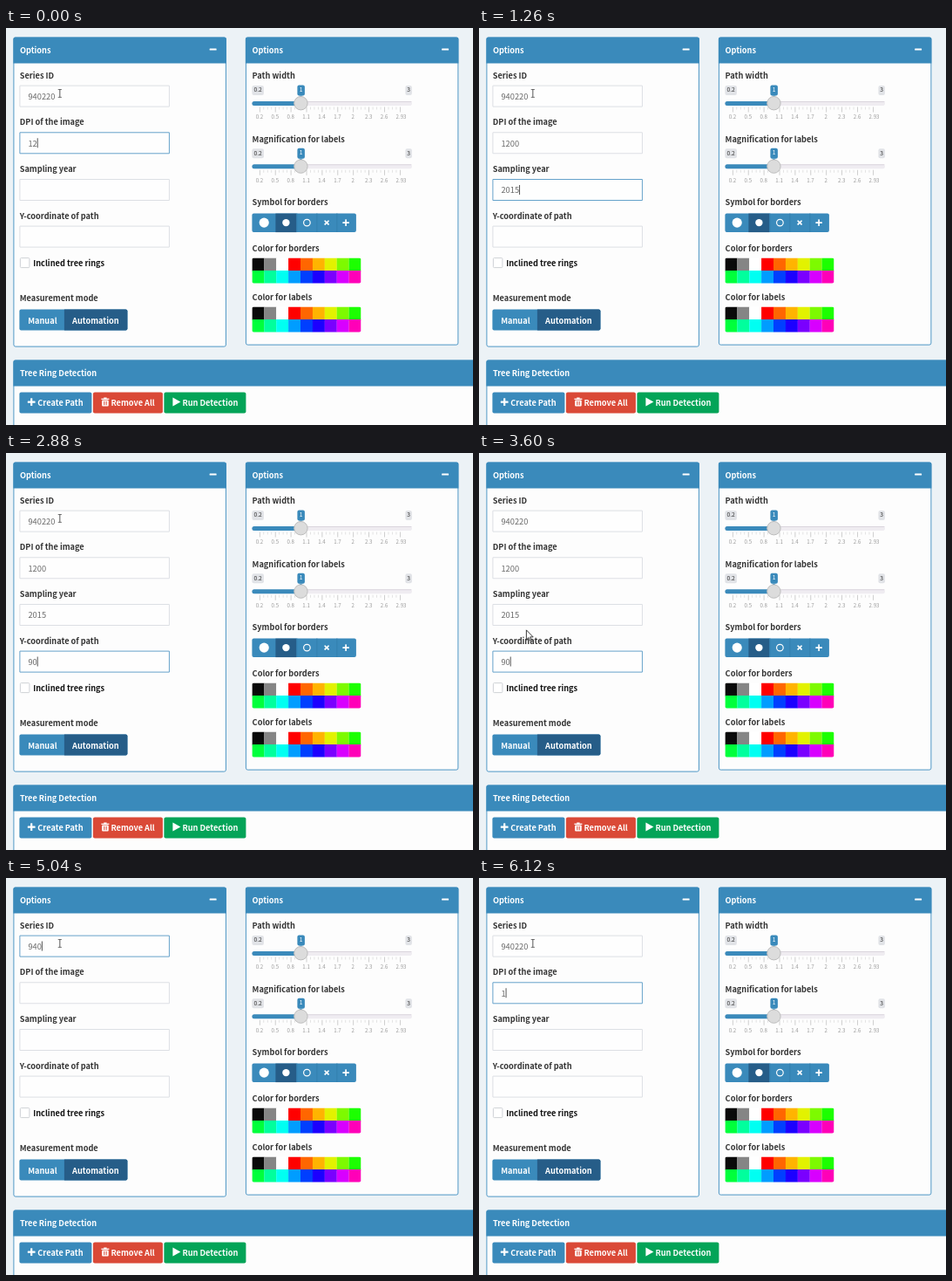
These frames come from a looping animation (536x455 px, 6.3 s). An HTML page with a canvas:

```html
<!DOCTYPE html>
<html lang="en">
<head>
<meta charset="utf-8">
<title>Tree ring options</title>
<style>
html, body { margin: 0; width: 100%; height: 100%; overflow: hidden; background: #ecf2f6; }
canvas { display: block; }
</style>
</head>
<body>
<canvas id="stage" width="536" height="455"></canvas>
<script>
const ctx = document.getElementById('stage').getContext('2d');
const LOOP = 6300, STEP = 180;
const FONT = '"Noto Sans CJK JP", "Noto Sans CJK SC", "Noto Sans CJK", "Noto Sans", sans-serif';
const PAGE = '#ecf2f6', BLUE = '#3a8abb', DARK = '#265d88', INK = '#333';

function rect(x, y, w, h, fill, radius = 0) {
  ctx.fillStyle = fill;
  ctx.beginPath();
  ctx.roundRect(x, y, w, h, radius);
  ctx.fill();
}

function frame(x, y, w, h, color, radius = 0) {
  ctx.strokeStyle = color;
  ctx.lineWidth = 1;
  ctx.beginPath();
  ctx.roundRect(x + .5, y + .5, w - 1, h - 1, radius);
  ctx.stroke();
}

function text(str, x, y, color = INK, size = 9.2, weight = 'bold', align = 'left') {
  ctx.font = `${weight} ${size}px ${FONT}`;
  ctx.fillStyle = color;
  ctx.textAlign = align;
  ctx.fillText(str, x, y);
}

function disc(x, y, r, fill, stroke, width = 1) {
  ctx.beginPath();
  ctx.arc(x, y, r, 0, Math.PI * 2);
  if (fill) { ctx.fillStyle = fill; ctx.fill(); }
  if (stroke) { ctx.strokeStyle = stroke; ctx.lineWidth = width; ctx.stroke(); }
}

function poly(points, fill, stroke, width = 1) {
  ctx.beginPath();
  points.forEach(([x, y]) => ctx.lineTo(x, y));
  ctx.closePath();
  ctx.fillStyle = fill;
  ctx.fill();
  if (stroke) {
    ctx.strokeStyle = stroke;
    ctx.lineWidth = width;
    ctx.lineJoin = 'round';
    ctx.stroke();
  }
}

function cross(x, y, r, width, angle = 0) {
  ctx.save();
  ctx.translate(x, y);
  ctx.rotate(angle);
  rect(-r, -width / 2, r * 2, width, '#fff', .5);
  rect(-width / 2, -r, width, r * 2, '#fff', .5);
  ctx.restore();
}

function panel(x, y, w, h, title, collapsible) {
  rect(x, y, w, h, '#fdfdfd', 2);
  frame(x, y, w, h, '#4b95c4', 2);
  rect(x, y, w, 30, BLUE, [2, 2, 0, 0]);
  text(title, x + 7.5, y + 18, '#fff');
  if (collapsible) rect(x + 225.2, y + 13, 8, 1.8, '#fff', .5);
}

function badge(label, x, y, w, h, fill, color) {
  rect(x, y, w, h, fill, 2);
  text(label, x + w / 2, y + 7.2, color, 6.8, 'normal', 'center');
}

function slider(y) {
  badge('0.2', 282, y - 20.5, 13.5, 11, '#e1e3e7', INK);
  badge('3', 458, y - 20.5, 7.5, 11, '#e1e3e7', INK);
  badge('1', 334, y - 21, 8.5, 12, BLUE, '#fff');
  poly([[336, y - 9], [340, y - 9], [338, y - 7]], BLUE);

  rect(282, y - 2.5, 183.5, 5, '#efecf1', 2.5);
  rect(338, y - 2.5, 127, 1, '#dad5dd');
  rect(282, y - 2.5, 57, 5, BLUE, 2.5);

  const marks = ['0.2', '0.5', '0.8', '1.1', '1.4', '1.7', '2', '2.3', '2.6', '2.93'];
  const gap = 17.9;
  marks.forEach((mark, i) => {
    const x = 290.5 + i * gap;
    rect(x, y + 4, .8, 6, '#c4c4c4');
    for (let k = 1; k < 4 && i < 9; k++) rect(x + k * gap / 4, y + 4, .8, 3, '#dcdcdc');
    text(mark, x + (i === 9 ? 1.5 : 0), y + 17.7, '#999', 6.1, 'normal', 'center');
  });
  disc(338, y - .2, 7.7, '#dcdcdc', '#bdbdbd');
}

function swatches(y) {
  const rows = [
    ['#0a0a0a', '#858585', '#fff', '#f00', '#ff6600', '#ffb400', '#e2f200', '#7dfa00', '#1cff00'],
    ['#00ff3c', '#00ff9d', '#00fff2', '#009dff', '#003fff', '#1c00ff', '#7a00ff', '#d800ff', '#ff00b8']
  ];
  ctx.save();
  ctx.beginPath();
  ctx.roundRect(282, y, 125, 29, 2);
  ctx.clip();
  rows.forEach((row, r) => row.forEach((color, c) => {
    rect(282 + c * 13.9, y + r * 14.5, 14, 15, color);
  }));
  ctx.restore();
}

function symbolButtons() {
  rect(282, 212, 119.5, 21.5, BLUE, 2);
  rect(309, 212, 24, 21.5, DARK);
  [333, 356, 379].forEach(x => rect(x, 212, 1, 21.5, '#337fae'));
  disc(295.8, 222.5, 5.6, '#fff');
  disc(321, 222.5, 4.2, '#fff');
  disc(345, 222.5, 3.8, null, '#fff', 1.2);
  cross(367.7, 222.5, 3.5, 1.7, Math.PI / 4);
  cross(389.7, 222.5, 3.8, 1.7);
}

function actionButtons(hover) {
  rect(15, 417, 83, 24, hover ? '#214f78' : BLUE, 2);
  cross(28.8, 428, 4.4, 2.2);
  text('Create Path', 35.9, 432, '#fff');

  rect(99.5, 417, 80, 24, '#da4937', 2);
  rect(109, 424, 9, 1.3, '#fff');
  rect(111.8, 422.9, 3.4, 1.4, '#fff');
  rect(109.7, 426, 7.6, 7, '#fff', 1);
  [111.5, 113.2, 114.9].forEach(x => rect(x, 427.1, .7, 4.6, '#da4937'));
  text('Remove All', 120, 432, '#fff');

  rect(181, 417, 94, 24, '#04a458', 2);
  poly([[191, 423], [200, 428], [191, 433]], '#fff');
  text('Run Detection', 202, 432, '#fff');
}

// Steps run from the empty form at zero to the click at the end.
const FIELDS = [
  { label: 'Series ID', y: 65, value: '940220', focus: 0, type: 1, blur: 8 },
  { label: 'DPI of the image', y: 118.7, value: '1200', focus: 8, type: 9, blur: 14 },
  { label: 'Sampling year', y: 172.4, value: '2015', focus: 14, type: 14, blur: 20 },
  { label: 'Y-coordinate of path', y: 226, value: '90', focus: 20, type: 25, blur: 34 }
];

function field({ label, y, value, focus, type, blur }, step) {
  const typed = value.slice(0, Math.max(0, step - type + 1));
  const active = step >= focus && step < blur;
  const fading = step === blur;
  text(label, 15.3, y - 8);
  rect(15, y, 172.5, 25, '#fefefe');
  frame(15, y, 172.5, 25, active ? '#65a2ca' : fading ? '#a8cfe3' : '#dcdfe4');
  text(typed, 25, y + 16.3, '#6a6a6a', 9.3, 'normal');
  const typing = step >= type && step <= type + value.length;
  const caretShown = typing || (step - focus) % 6 === 0 || step > type;
  if (active && caretShown) {
    rect(25 + ctx.measureText(typed).width, y + 7, 1, 11, '#555');
  }
}

function iBeam(x, y) {
  rect(x, y - 5, .9, 9.5, '#444');
  rect(x - 1.7, y - 5, 4.2, .8, '#555');
  rect(x - 1.7, y + 3.8, 4.2, .8, '#555');
}

function arrow(x, y) {
  poly([[0, 0], [0, 11], [2.6, 8.7], [4.4, 12.5], [6, 11.8], [4.3, 8], [7.8, 8]]
    .map(([px, py]) => [x + px, y + py]), '#fff', '#222', .9);
}

function hand(x, y) {
  poly([[-1, 0], [.6, 0], [1, 4.4], [2.8, 4.4], [4.3, 5], [5.8, 5.6], [6, 9], [4.8, 12.3],
    [-.6, 12.3], [-4, 8], [-3.2, 6.8], [-1.4, 8]]
    .map(([px, py]) => [x + px, y + py]), '#fff', '#222', .9);
}

function pointer(step) {
  const p = Math.min(1, Math.max(0, (step - 28) / 5));
  const e = p * p * (3 - 2 * p);
  const x = 61 - 20 * e, y = 74.5 + 363 * e;
  const overField = FIELDS.some(f => y >= f.y && y <= f.y + 25);
  const overButton = y >= 417 || y >= 322 && y <= 346;
  if (overField) iBeam(x, y);
  else if (overButton) hand(x, y - 1);
  else arrow(x, y);
}

function draw(time) {
  const step = (Math.floor(time % LOOP / STEP) + 10) % 35;
  rect(0, 0, 536, 455, PAGE);
  ctx.save();
  // The page sits between whole pixels, which softens its edges.
  ctx.translate(.4, .6);

  panel(8, 10, 244.5, 355, 'Options', true);
  FIELDS.forEach(f => field(f, step));
  rect(15.5, 262.5, 11.5, 12, '#fff', 1);
  frame(15.5, 262.5, 11.5, 12, '#cfd2d6', 1);
  text('Inclined tree rings', 30.8, 272.3, '#111');
  text('Measurement mode', 15.3, 312.3);
  rect(15, 322, 124, 24, BLUE, 2);
  rect(66.5, 322, 72.5, 24, DARK, [0, 2, 2, 0]);
  text('Manual', 24.8, 338, '#fff');
  text('Automation', 75.7, 338, '#fff');

  panel(274.5, 10, 244.5, 353, 'Options', true);
  text('Path width', 282.2, 57);
  slider(85.8);
  text('Magnification for labels', 282.2, 130);
  slider(158.2);
  text('Symbol for borders', 282.2, 202.5);
  symbolButtons();
  text('Color for borders', 282.2, 255.3);
  swatches(263);
  text('Color for labels', 282.2, 311.3);
  swatches(319);

  panel(8, 380, 560, 100, 'Tree Ring Detection', false);
  actionButtons(step >= 33);
  pointer(step);
  ctx.restore();
}

function tick(now) {
  draw(now);
  requestAnimationFrame(tick);
}
draw(0);
requestAnimationFrame(tick);
</script>
</body>
</html>
```
